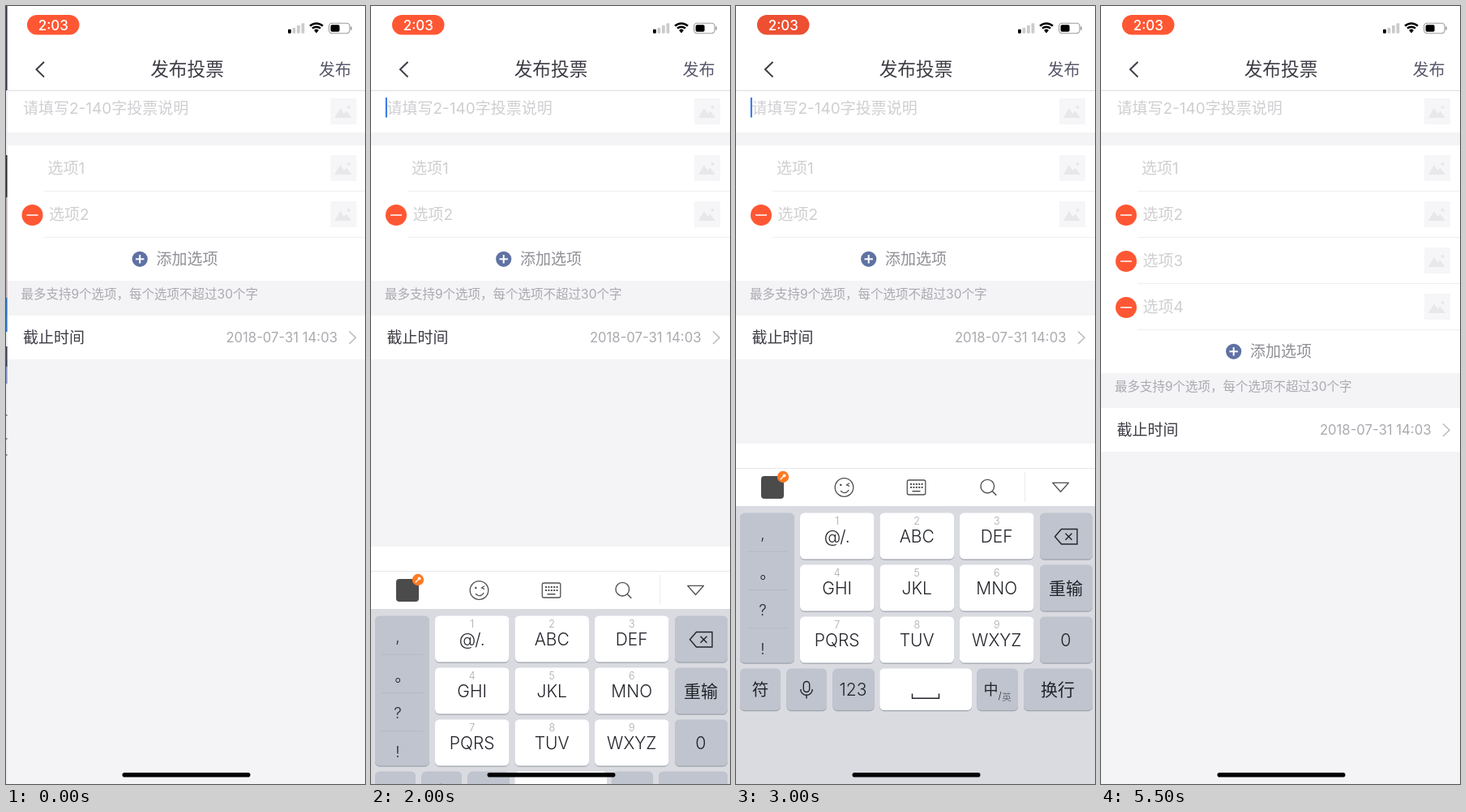
Recreate the animation shown at these times as an HTML page with a canvas. Size 443 px wide and 960 px high, loop 5.6 s.

```html
<!DOCTYPE html>
<html lang="zh-CN">
<head>
<meta charset="utf-8">
<style>
html, body { margin: 0; width: 100%; height: 100%; overflow: hidden; background: #f4f4f7; }
canvas { display: block; width: 443px; height: 960px; }
</style>
</head>
<body>
<canvas id="stage" width="443" height="960"></canvas>
<script>
const g = document.getElementById('stage').getContext('2d');
const W = 443, H = 960, LOOP = 5600, STEP = 100, ROW = 57;
const FONT = 'Inter, "Noto Sans CJK SC", "Noto Sans CJK", sans-serif';
const INK = '#3c3c44', GREY = '#f4f4f7', HINT = '#cfcfd2', RED = '#ff5733';

function rect(x, y, w, h, color) {
  g.fillStyle = color;
  g.fillRect(x, y, w, h);
}

function round(x, y, w, h, r, color) {
  g.fillStyle = color;
  g.beginPath();
  g.roundRect(x, y, w, h, r);
  g.fill();
}

function disc(x, y, r, color) {
  g.fillStyle = color;
  g.beginPath();
  g.arc(x, y, r, 0, Math.PI * 2);
  g.fill();
}

function poly(points, close) {
  g.beginPath();
  for (let i = 0; i < points.length; i += 2) g.lineTo(points[i], points[i + 1]);
  if (close) g.closePath();
}

function line(points, color, width, close) {
  poly(points, close);
  g.strokeStyle = color;
  g.lineWidth = width;
  g.stroke();
}

function arc(x, y, r, a, b, color, width) {
  g.beginPath();
  g.arc(x, y, r, a, b);
  g.strokeStyle = color;
  g.lineWidth = width;
  g.stroke();
}

// Text is placed by its vertical middle.
function text(s, x, y, size, color, align = 'left', weight = 400) {
  g.font = `${weight} ${size}px ${FONT}`;
  g.textAlign = align;
  g.fillStyle = color;
  g.fillText(s, x, y + size * 0.37);
}

function statusBar(t) {
  const d = Math.abs(t % 2000 - 1000);
  const k = d < 500 ? (1 + Math.cos(Math.PI * d / 500)) / 2 : 0;
  round(26, 11, 64.5, 24.5, 12.25, `rgb(${255 - 18 * k},${87 - 8 * k},${51 - k})`);
  text('2:03', 58.3, 23.3, 17, '#fff', 'center', 500);

  for (let i = 0; i < 4; i++) {
    const h = [5, 7, 10, 12.5][i];
    round(348 + i * 5.5, 33.8 - h, 3.8, h, 1, i ? '#cbcbcb' : '#000');
  }

  const up = -Math.PI / 2;
  for (const r of [11.5, 7.3]) arc(383, 33, r, up - 0.76, up + 0.76, '#000', 2.5);
  g.fillStyle = '#000';
  g.beginPath();
  g.moveTo(383, 33.5);
  g.arc(383, 33, 4.2, up - 0.76, up + 0.76);
  g.fill();

  g.strokeStyle = '#9a9a9a';
  g.lineWidth = 1.1;
  g.beginPath();
  g.roundRect(398.6, 21.3, 25.5, 12.4, 3.6);
  g.stroke();
  round(400.6, 23.2, 11, 8.6, 1.8, '#000');
  round(425.2, 25.3, 1.6, 4.4, 1, '#9a9a9a');
}

function picture(y) {
  const tone = '#e8e8eb';
  rect(399, y, 32, 32, '#f6f6f8');
  g.fillStyle = tone;
  poly([404, y + 24, 411, y + 12, 415.5, y + 19, 418.5, y + 15.5, 425, y + 24], true);
  g.fill();
  disc(421.5, y + 11, 2, tone);
}

function option(n) {
  const y = 200 + (n - 1) * ROW;
  if (n > 1) {
    disc(31, y + 1, 13, RED);
    line([24, y + 1, 38, y + 1], '#fff', 1.5);
  }
  text('选项' + n, n > 1 ? 51.5 : 50, y, 19, HINT);
  picture(y - 16);
  rect(45, y + 28, W - 45, 1, '#efeff1');
}

function page(count, caret) {
  rect(0, 0, W, H, GREY);
  rect(0, 0, W, 156, '#fff');
  rect(0, 104, W, 1, '#dddde1');
  line([45.5, 69, 36, 78.3, 45.5, 87.6], INK, 2);
  text('发布投票', 222, 78, 22.7, INK, 'center', 500);
  text('发布', 424.5, 78.5, 20, '#55556a', 'right');

  text('请填写2-140字投票说明', 19.5, 125.5, 19, HINT);
  picture(114);
  if (caret) rect(17.8, 113, 2.2, 24.5, '#3f7de8');

  const dy = (count - 2) * ROW;
  rect(0, 172, W, 167 + dy, '#fff');
  for (let n = 1; n <= count; n++) option(n);

  g.save();
  g.translate(0, dy);
  disc(163.7, 312.3, 9.6, '#5f72a3');
  line([158.5, 312.3, 168.9, 312.3], '#fff', 2);
  line([163.7, 307.1, 163.7, 317.5], '#fff', 2);
  text('添加选项', 184, 312.3, 19, '#8f8f96');
  text('最多支持9个选项，每个选项不超过30个字', 17, 355, 15.5, '#aaaaaf');
  rect(0, 382, W, 54, '#fff');
  text('截止时间', 19.5, 409.3, 19, INK);
  text('2018-07-31 14:03', 407.5, 409, 16.7, '#aaaaaf', 'right');
  line([422, 401.5, 430, 409.2, 422, 417], '#b9b9be', 1.5);
  g.restore();
}

// A sliver of the page that is being pushed away.
function previousPage() {
  rect(0, 0, 1.5, H, '#e9e9ee');
  rect(0, 0, 1.5, 104, '#34334a');
  rect(0, 184, 1.5, 52, '#2d2a30');
  rect(0, 236, 1.5, 124, '#b5a9b0');
  rect(0, 360, 1.5, 42, '#2c73c0');
  rect(0, 420, 1.5, 25, '#3a3c55');
  rect(0, 445, 1.5, 21, '#7c8fc0');
  for (const y of [504, 533, 553]) rect(0, y, 1.5, 2, '#888');
}

function key(x, y, w, h, white) {
  round(x, y + 1.2, w, h, 5.5, '#9fa2ab');
  round(x, y, w, h, 5.5, white ? '#fff' : '#c0c4ce');
}

function toolbar() {
  const c = '#505050';
  rect(0, 0, W, 77, '#fff');
  rect(0, 30, W, 1, '#e8e8eb');
  round(31, 40, 28, 28, 4, '#4b4b4b');
  disc(58, 41, 7.2, '#ff7a22');
  disc(59.6, 39.4, 1.9, '#fff');
  line([58.5, 40.5, 54.8, 44.2], '#fff', 1.3);

  arc(133.5, 54, 11.3, 0, Math.PI * 2, c, 1.3);
  arc(133.8, 55, 5.6, 0.35, Math.PI - 0.6, c, 1.3);
  disc(129.3, 51, 1.3, c);
  line([140, 48.8, 136.5, 51, 140, 52.6], c, 1.2);

  g.lineWidth = 1.3;
  g.beginPath();
  g.roundRect(211.3, 45, 22.5, 18, 2);
  g.stroke();
  for (let i = 0; i < 10; i++) rect(215 + (i % 5) * 3.4, 49 + (i > 4 ? 4 : 0), 2, 2, c);
  rect(217.5, 58, 10, 1.5, c);

  arc(310.3, 52.7, 8.3, 0, Math.PI * 2, c, 1.4);
  line([316.3, 58.7, 321.3, 63.7], c, 1.6);
  rect(356, 35, 1, 37, '#ededf0');
  g.lineJoin = 'round';
  line([390.7, 48.3, 410.5, 48.3, 400.6, 59.5], c, 1.3, true);
  g.lineJoin = 'miter';
}

function keyboard(top) {
  const ink = '#22242a', first = 85.5, pitch = 64;
  const label = (s, x, y, size, color = ink) => text(s, x, y, size, color, 'center', 300);
  g.save();
  g.translate(0, top);
  toolbar();
  rect(0, 77, W, 343, '#d9dbe1');

  key(5, first, 67, 185);
  [[',', 111], ['。', 160], ['?', 205], ['!', 253]].forEach(([s, y], i) => {
    label(s, s === '。' ? 39 : 33, y, 19);
    if (i) rect(13, first + i * 47.3, 51, 1, '#b6bac4');
  });

  ['@/.', 'ABC', 'DEF', 'GHI', 'JKL', 'MNO', 'PQRS', 'TUV', 'WXYZ'].forEach((s, i) => {
    const x = 79 + (i % 3) * 98.5, y = first + Math.floor(i / 3) * pitch;
    key(x, y, 91.5, 57, true);
    label(i + 1, x + 45.7, y + 9.5, 12.5, '#a8a8ac');
    label(s, x + 45.7, y + 29.2, 21);
  });

  for (let i = 0; i < 3; i++) key(375, first + i * pitch, 65, 57);
  line([393.5, 114.7, 401.5, 105.5, 421, 105.5, 421, 124, 401.5, 124], ink, 1.4, true);
  line([406.5, 110.7, 414.5, 118.7], ink, 1.4);
  line([414.5, 110.7, 406.5, 118.7], ink, 1.4);
  label('重输', 407, 178, 21);
  label('0', 407, 242, 21.5);

  [[5, 50], [62.5, 49.5], [119.5, 51], [177.3, 113.7], [297.5, 50.5], [355, 85]].forEach(
    ([x, w], i) => key(x, first + 3 * pitch, w, 51.5, i === 3));
  label('符', 30, 303.3, 20.5);
  g.strokeStyle = ink;
  g.lineWidth = 1.4;
  g.beginPath();
  g.roundRect(83.3, 293.5, 7.4, 13, 3.7);
  g.stroke();
  arc(87, 303, 7.3, 0, Math.PI, ink, 1.4);
  line([87, 310.5, 87, 314.5], ink, 1.4);
  label('123', 144.5, 303.3, 21);
  line([217.5, 308.5, 217.5, 314.3, 250.5, 314.3, 250.5, 308.5], ink, 1.5);
  label('中', 314.5, 303.3, 18);
  label('/', 325.5, 310.5, 12);
  label('英', 334, 312.3, 11.5, '#6c6f77');
  label('换行', 397, 303.3, 21);
  g.restore();
}

// Critically damped spring: distance left, from 1 to 0.
function spring(ms) {
  const x = Math.max(0, ms) * 0.01826;
  return (1 + x) * Math.exp(-x);
}

function keyboardTop(t) {
  if (t < 1900 || t >= 3900) return H;
  return Math.round(t <= 3600 ? 540 + 420 * spring(t - 1867) : H - 420 * (1 - spring(0)) - 420 * spring(t - 3589));
}

function draw(t) {
  const count = t < 3700 ? 2 : t < 4300 ? 3 : 4;
  const caret = t >= 1900 && t < 3700 && (t - 1900) % 1000 < 600;
  const pushed = t < STEP;
  g.save();
  if (pushed) g.translate(1.5, 0);
  page(count, caret);
  g.restore();
  if (pushed) previousPage();
  statusBar(t);
  const top = keyboardTop(t);
  if (top < H) keyboard(top);
  round(143.5, 946, 158, 5.6, 2.8, '#000');
}

const start = performance.now();
function tick() {
  const t = (performance.now() - start) % LOOP;
  draw(Math.floor(t / STEP) * STEP);
  requestAnimationFrame(tick);
}
tick();
</script>
</body>
</html>
```
